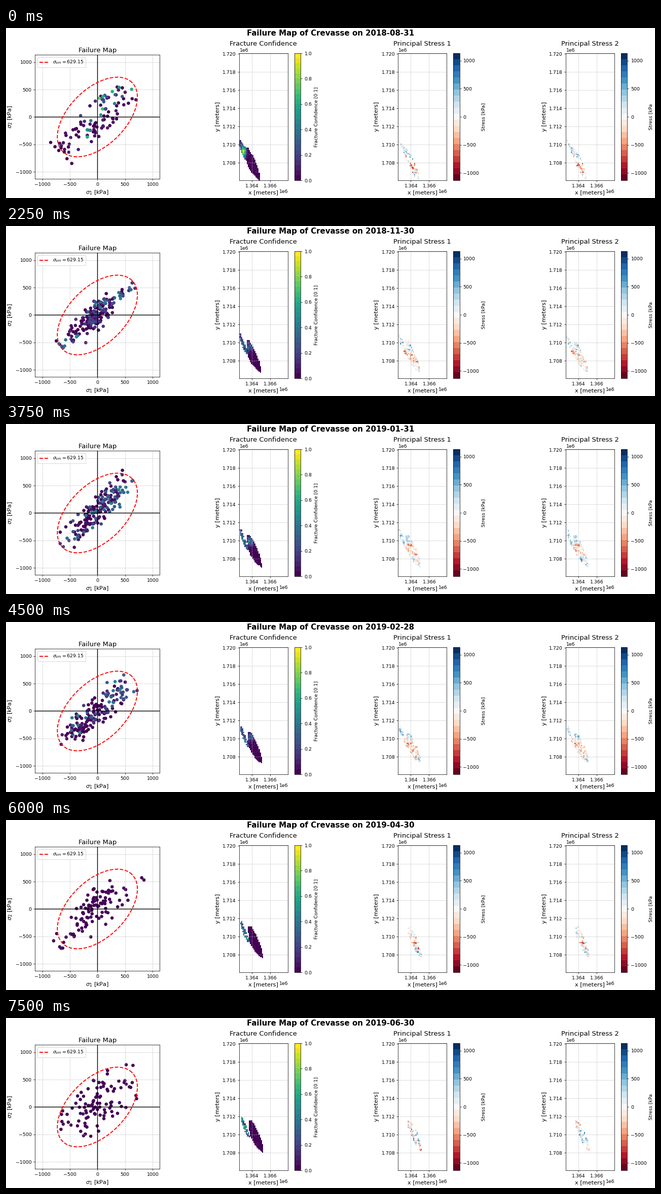
Write a matplotlib script that moves like this. It is 1280x337 px and loops after 8 s.

```python
import numpy as np
import matplotlib.pyplot as plt
from matplotlib.animation import FuncAnimation
from matplotlib.ticker import MultipleLocator

W, H = 1280, 337
DPI = 1280 / 19
YIELD = 629.15
LIM = 1.8 * YIELD
MONTHS = 11
STEP, HOLD = 250, 3            # ms per tick, ticks per month
UNIT = 1000 / 18               # metres per map unit
CELL = 2.16                    # map units per cell
X0, Y0 = 1362611, 1706083      # lower left corner of the maps
MAP_W, MAP_H = 96.5, 252

plt.rcParams["font.family"] = "DejaVu Sans"
VIRIDIS = plt.get_cmap("viridis", 25)
RDBU = plt.get_cmap("RdBu", 21)

u_edge, v_edge = np.arange(46) * CELL, np.arange(118) * CELL
uu, vv = np.meshgrid(u_edge[:-1] + CELL / 2, v_edge[:-1] + CELL / 2)


def bump(u, v, su, sv):
    return np.exp(-(u / su) ** 2 - (v / sv) ** 2)


def soft_noise(rng):
    n = rng.standard_normal(uu.shape)
    return (n + np.roll(n, 1, 0) + np.roll(n, 1, 1)
            + np.roll(n, (1, 1), (0, 1))) / 2


def date(m):
    """Last day of the month, counted from August 2018."""
    return str((np.datetime64("2018-09") + m).astype("datetime64[D]") - 1)


def ice(m, rng):
    """Masks of the main body and the side strip, and depth along the body."""
    u, v = uu - .72 * (m - 1), vv - 3.4 * (m - 1)
    t = (68 - v) / 64
    k = np.clip(t, 0, 1)
    body = ((t > 0) & (t < 1) & (u > 13 + 28 * k ** 3)
            & (u < 19 + 23 * np.sin(np.pi * k / 2)))

    u, v = uu - .5 * (m - 1), vv - 2.5 * (m - 1)
    s = (83 - v) / 41
    k = np.clip(s, 0, 1)
    gap = 15 + 12 * np.exp(-3 * m)
    strip = ((s > 0) & (s < 1) & (u > 14 * k ** 1.5 - 1) & (u < 3 + gap * k)
             & ~body & (rng.random(uu.shape) < (.93 if m else 1)))
    return body, strip, t


def build(m):
    """Confidence and both stress maps, and the cells they share."""
    rng = np.random.default_rng(40 + m)
    body, strip, t = ice(m, rng)
    shown = body | strip
    wave = max(0, np.sin(np.pi * m / 8))   # winter months cover more cells
    spread = ((m - 3.5) / 6) ** 2          # stresses scatter more at the ends

    u, v = uu - .72 * m, vv - 3.4 * m
    conf = strip * (.15 + .025 * m) * (1 + .35 * soft_noise(rng))
    conf += .03 * np.abs(soft_noise(rng))
    conf += .75 * np.exp(-m) * bump(u - 9, v - 58, 5, 11)
    conf += .4 * wave * bump(u - 18, v - 52, 7, 9) * (1 + .4 * soft_noise(rng))
    conf = np.clip(conf, 0, 1)

    axis = 14 + .42 * (66 - v)
    near = shown & (np.abs(u - axis) < 7 + 60 * wave)
    rank = soft_noise(rng)
    share = min(1, (100 + 90 * wave) / near.sum())
    live = near & (rank <= np.quantile(rank[near], share))

    # Mean stress swings along the body; the difference is plain noise.
    phase = np.pi * ((m - 5.3) / 4.6) ** 4
    mean = .75 * np.cos(2 * np.pi * t + phase) + .75 * soft_noise(rng)
    mean = (430 + 100 * spread) * np.clip(mean, -2, 2)
    diff = (110 + 75 * spread) * np.clip(soft_noise(rng), -2, 2)
    first, second = (mean + diff) / np.sqrt(2), (mean - diff) / np.sqrt(2)

    grids = [np.ma.array(conf, mask=~shown),
             np.ma.array(first, mask=~live),
             np.ma.array(second, mask=~live)]
    points = np.column_stack([first[live], second[live]])
    return points, conf[live], grids


DATA = [build(m) for m in range(MONTHS)]

fig = plt.figure(figsize=((W + 1e-4) / DPI, (H + 1e-4) / DPI), dpi=DPI,
                 facecolor="white")


def panel(x, y, w, h):
    return fig.add_axes([x / W, 1 - (y + h) / H, w / W, h / H])


def dress(ax, title, xlabel, ylabel, step):
    ax.set_title(title, fontsize=14)
    ax.set_xlabel(xlabel, fontsize=12)
    ax.set_ylabel(ylabel, fontsize=12)
    ax.xaxis.set_major_locator(MultipleLocator(step))
    ax.yaxis.set_major_locator(MultipleLocator(step))
    ax.ticklabel_format(useOffset=False)
    ax.grid(True, ls="--", alpha=.8)


def failure_panel():
    ax = panel(57.2, 53.4, 246, 246)
    ax.set(xlim=(-LIM, LIM), ylim=(-LIM, LIM))
    dress(ax, "Failure Map", r"$\sigma_1$ [kPa]", r"$\sigma_2$ [kPa]", 500)
    ax.axhline(0, color="black", lw=1.5)
    ax.axvline(0, color="black", lw=1.5)
    a = np.linspace(0, 2 * np.pi, 400)
    major, minor = np.cos(a), np.sin(a) / np.sqrt(3)
    ax.plot(YIELD * (major - minor), YIELD * (major + minor), "r--", lw=2,
            label=r"$\sigma_{vm}=629.15$")
    ax.legend(loc="upper left")
    return ax.scatter([0], [0], c=[0], s=36, cmap=VIRIDIS, vmin=0, vmax=1)


def map_panel(x, title, cmap, lo, hi, step, label):
    ax = panel(x, 50, MAP_W, MAP_H)
    mesh = ax.pcolormesh(X0 + u_edge * UNIT, Y0 + v_edge * UNIT,
                         DATA[0][2][0], cmap=cmap, vmin=lo, vmax=hi)
    ax.set(xlim=(X0, X0 + MAP_W * UNIT), ylim=(Y0, Y0 + MAP_H * UNIT))
    dress(ax, title, "x [meters]", "y [meters]", 2000)
    bar = fig.colorbar(mesh, cax=panel(x + 109.3, 50, 12.5, MAP_H),
                       ticks=MultipleLocator(step))
    bar.set_label(label)
    return mesh


heading = fig.text(.5, 1 - 14.5 / H, "", ha="center", va="baseline",
                   fontsize=16, fontweight="bold")
dots = failure_panel()
meshes = [
    map_panel(459.6, "Fracture Confidence", VIRIDIS, 0, 1, .2,
              "Fracture Confidence [0:1]"),
    map_panel(772.9, "Principal Stress 1", RDBU, -LIM, LIM, 500,
              "Stress [kPa]"),
    map_panel(1103.6, "Principal Stress 2", RDBU, -LIM, LIM, 500,
              "Stress [kPa"),
]


def update(tick):
    m = tick // HOLD
    points, conf, grids = DATA[m]
    heading.set_text(f"Failure Map of Crevasse on {date(m)}")
    dots.set_offsets(points)
    dots.set_array(conf)
    for mesh, grid in zip(meshes, grids):
        mesh.set_array(grid)
    return [heading, dots, *meshes]


anim = FuncAnimation(fig, update, frames=32, interval=STEP, repeat=True,
                     repeat_delay=0, init_func=lambda: update(0))
plt.show()
```
